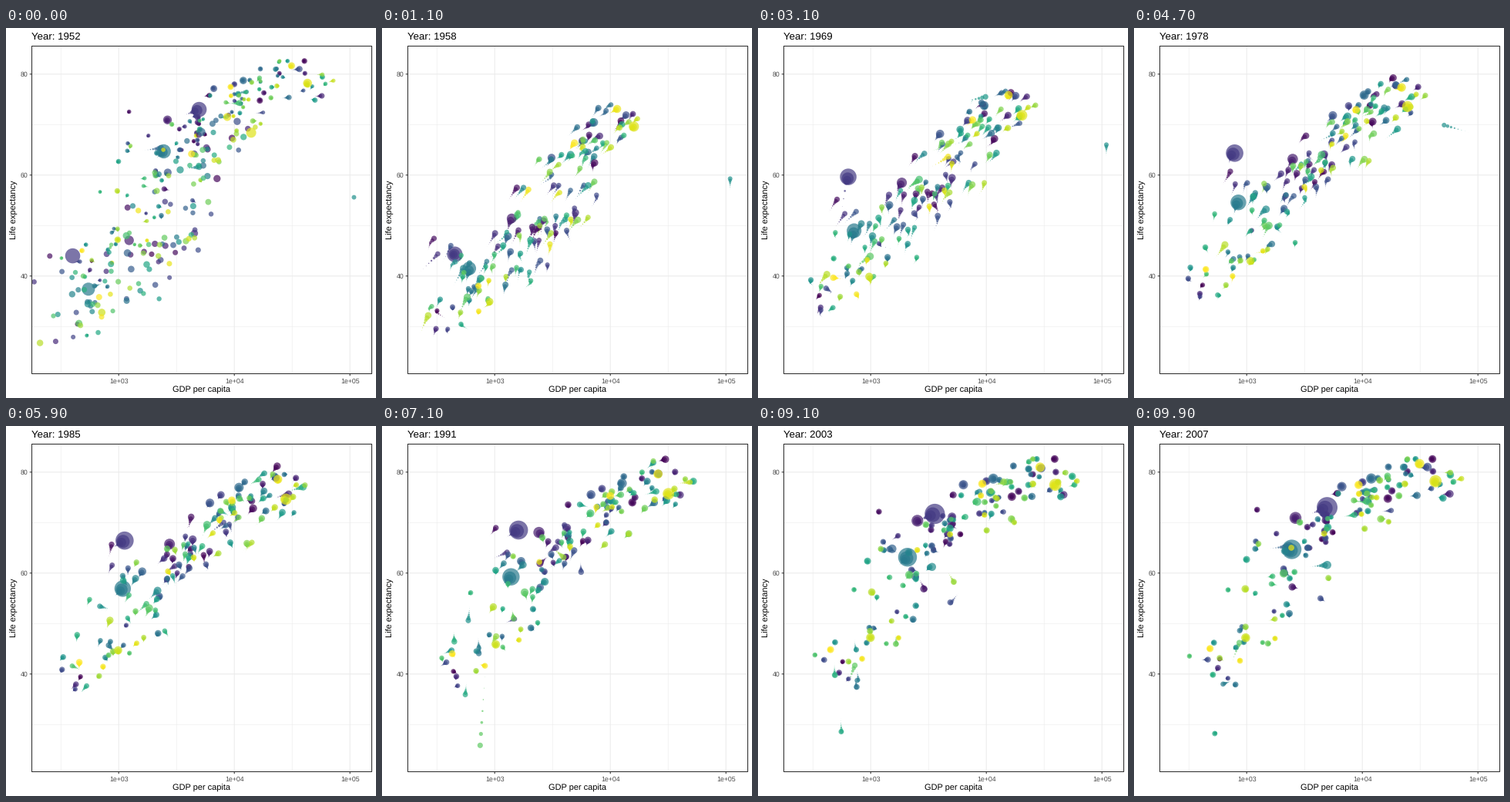
Write a matplotlib script that moves like this. It is 480x480 px and loops after 10000 ms.

```python
import numpy as np
import matplotlib.pyplot as plt
from matplotlib.animation import FuncAnimation

SIZE, DPI = 480, 72
FRAMES, INTERVAL, WAKE = 100, 100, 10
LEFT, RIGHT, TOP, BOTTOM = 33.5, 474.5, 23.5, 448.5
YEARS = np.arange(1952, 2008, 5)
TIMES = np.linspace(YEARS[0], YEARS[-1], FRAMES)
TOTAL, MAX_POP = 142, 1318.7

plt.rcParams.update({"font.family": "Liberation Sans", "text.hinting": "none"})
rng = np.random.default_rng(5)

# Distinctive tracks: colour rank, population (millions) at both ends,
# then (year, income, life expectancy) turning points.
TRACKS = [
    (24, 556, 1318, [(1952, 400, 44), (1962, 488, 44.5), (1967, 613, 58.4),
                     (1977, 741, 64), (1992, 1656, 68.7), (2007, 4959, 73)]),
    (58, 372, 1110, [(1952, 547, 37.4), (1977, 813, 54.2), (2007, 2452, 64.7)]),
    (134, 158, 301, [(1952, 13990, 68.4), (1977, 24073, 73.4), (2007, 42952, 78.2)]),
    (71, 0.2, 2.5, [(1952, 108382, 55.6), (1972, 109348, 67.7),
                    (1982, 31354, 71.3), (2007, 47307, 77.6)]),
    (106, 2.5, 8.9, [(1952, 493, 40), (1987, 848, 44), (1992, 737, 23.6),
                     (1997, 590, 36.1), (2007, 863, 46.2)]),
]

# Count, log income, life expectancy and its spread (first to last year),
# width of log incomes, typical population.
REGIONS = [
    (52, (3.02, 3.2), (39.1, 56), (5, 8), 0.34, 4),
    (24, (3.45, 3.92), (52.7, 73.4), (8.5, 3.8), 0.24, 5),
    (29, (3.12, 3.8), (46.5, 71), (8.5, 6), 0.45, 9),
    (32, (3.74, 4.36), (64.8, 77.7), (5, 2.4), 0.22, 7),
]
LINK = 0.75


def ease(t, power=1.7):
    return 1 - (1 - t) ** power


def blend(ends):
    return ends[0] + (ends[1] - ends[0]) * ease(np.linspace(0, 1, len(YEARS)))


def growth(start, end):
    return np.geomspace(start, end, len(YEARS), axis=-1)


def dot_scale(pop):
    return 2 + 10 * np.sqrt(pop / MAX_POP)


def deviates(n):
    """Evenly spaced values with unit deviation, in random order."""
    return rng.permutation(np.linspace(-1.73, 1.73, n))[:, None]


def wander(n, step):
    walk = np.cumsum(rng.laplace(0, step, (n, len(YEARS))), axis=1)
    return walk - walk.mean(axis=1, keepdims=True)


def region_tracks(n, income, life, spread, width, pop):
    rich, health = deviates(n), deviates(n)
    score = LINK * rich + np.sqrt(1 - LINK ** 2) * health
    x = blend(income) + width * rich + wander(n, 0.03)
    y = blend(life) + blend(spread) * score + wander(n, 0.3)
    start = pop * np.exp(rng.normal(0, 1.2, n))
    return x, y, dot_scale(growth(start, 2.2 * start))


def build():
    tables = np.zeros((3, TOTAL, len(YEARS)))
    for rank, first, last, path in TRACKS:
        when, income, life = np.array(path).T
        tables[:, rank] = (np.interp(YEARS, when, np.log10(income)),
                           np.interp(YEARS, when, life),
                           dot_scale(growth(first, last)))
    free = rng.permutation(np.setdiff1d(np.arange(TOTAL), [t[0] for t in TRACKS]))
    tables[:, free] = np.concatenate([region_tracks(*r) for r in REGIONS], axis=1)

    # An epidemic lowers some lives in the first region after 1987.
    struck = free[:REGIONS[0][0]:6]
    tables[1, struck] -= 11 * np.interp(YEARS, [1987, 2002], [0, 1])
    tables[1] = np.clip(tables[1], 23, 82.6)
    return tables


def px(log_income):
    return 146.2 + 150 * (log_income - 3)


def py(life):
    return 59.85 + 6.548 * (80 - life)


def tween(table):
    return np.array([np.interp(TIMES, YEARS, row) for row in table]).T


logs, lives, scales = build()
X, Y = px(tween(logs)), py(tween(lives))
DIAMETER = 0.75 * (2.845 * tween(scales) + 0.94) + 0.7
COLORS = plt.get_cmap("viridis")(np.linspace(0, 1, TOTAL))
COLORS[:, 3] = 0.7

fig = plt.figure(figsize=(SIZE / DPI, SIZE / DPI), dpi=DPI, facecolor="white")
ax = fig.add_axes([0, 0, 1, 1])
ax.set(xlim=(0, SIZE), ylim=(SIZE, 0))
ax.axis("off")


def line(x, y, color, width, z=1):
    ax.plot(x, y, color=color, lw=width, zorder=z, snap=False, solid_capstyle="butt")


def grid(logs, lives, width):
    for v in logs:
        line([px(v)] * 2, [TOP, BOTTOM], "#ebebeb", width)
    for v in lives:
        line([LEFT, RIGHT], [py(v)] * 2, "#ebebeb", width)


def tick_label(x, y, text, align):
    ax.text(x, y, text, size=8.8, color="#4d4d4d", ha=align, va="baseline")


grid((2.5, 3.5, 4.5), (70, 50, 30), 0.55)
grid((3, 4, 5), (80, 60, 40), 1.07)
for v in (3, 4, 5):
    line([px(v)] * 2, [BOTTOM, BOTTOM + 2.75], "#333333", 1.07)
    tick_label(px(v), 460.5, f"1e+0{v}", "center")
for v in (80, 60, 40):
    line([LEFT - 2.75, LEFT], [py(v)] * 2, "#333333", 1.07)
    tick_label(28.5, py(v) + 3.2, str(v), "right")
line([LEFT, RIGHT, RIGHT, LEFT, LEFT], [TOP, TOP, BOTTOM, BOTTOM, TOP], "#333333", 1.07, 5)
ax.text((LEFT + RIGHT) / 2, 473, "GDP per capita", size=11, ha="center", va="baseline")
ax.text(13.3, (TOP + BOTTOM) / 2, "Life expectancy", size=11, rotation=90,
        rotation_mode="anchor", ha="center", va="baseline")
title = ax.text(32.6, 15, "", size=13.2, va="baseline")

# Each dot drags smaller copies of its last positions, oldest at the back.
BACK = np.arange(WAKE - 1, -1, -1)
SHRINK = (1 - BACK / WAKE) ** 3
dots = ax.scatter(np.zeros(TOTAL * WAKE), np.zeros(TOTAL * WAKE), linewidths=0, zorder=3,
                  color=np.tile(COLORS, (WAKE, 1)))


def update(i):
    rows = (i - BACK) % FRAMES
    dots.set_offsets(np.column_stack([X[rows].ravel(), Y[rows].ravel()]))
    dots.set_sizes((DIAMETER[rows] * SHRINK[:, None]).ravel() ** 2)
    title.set_text(f"Year: {round(TIMES[i])}")
    return dots, title


anim = FuncAnimation(fig, update, frames=FRAMES, interval=INTERVAL, repeat=True,
                     repeat_delay=0, blit=False)
plt.show()
```
